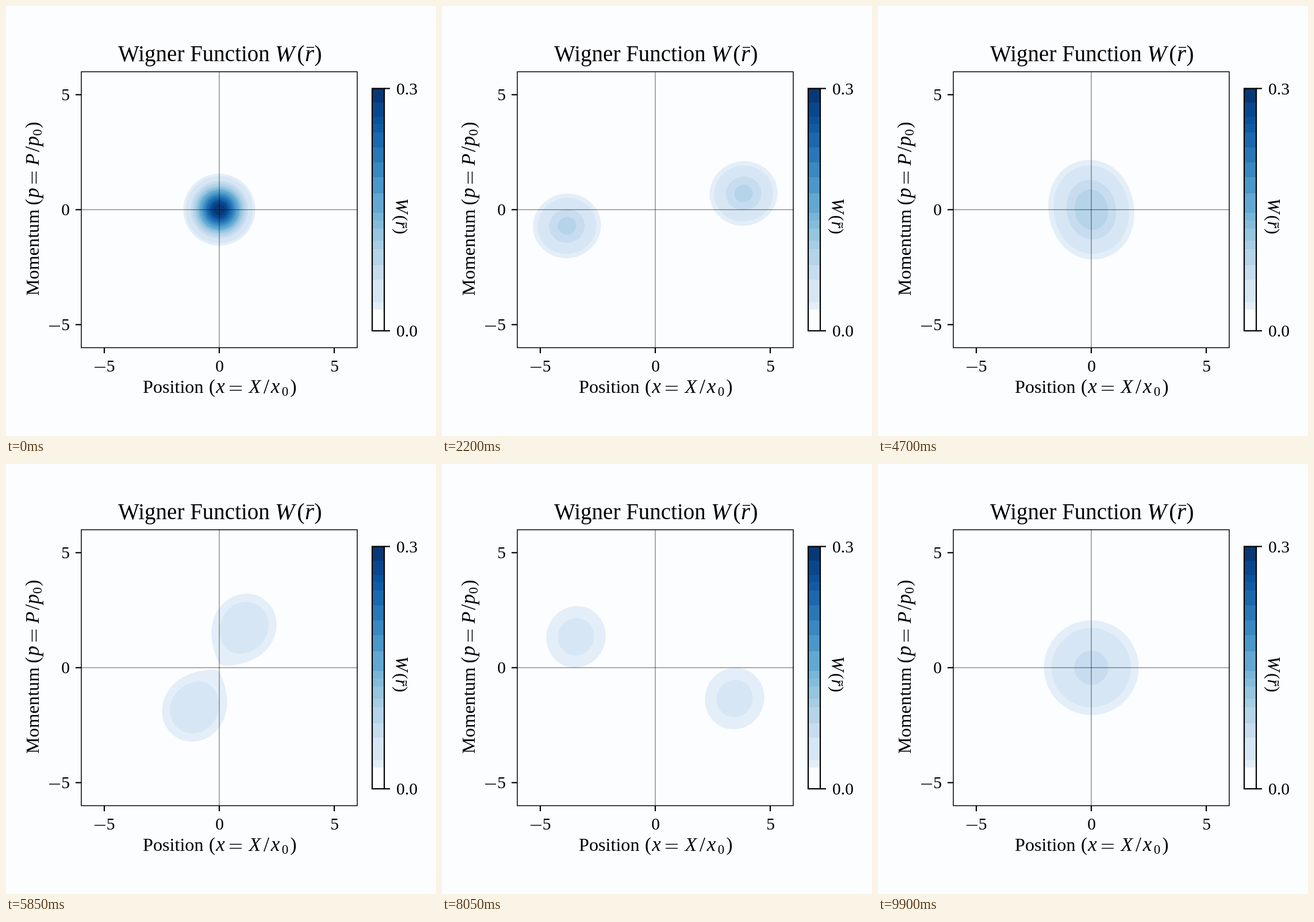
An HTML page with a canvas for the animation above (10 s loop, 748x748 px).

```html
<!DOCTYPE html>
<html lang="en">
<head>
<meta charset="utf-8">
<title>Wigner Function</title>
<style>
html, body { margin: 0; width: 100%; height: 100%; overflow: hidden; background: #fcfdff; }
canvas { display: block; }
</style>
</head>
<body>
<canvas id="stage" width="748" height="748"></canvas>
<script>
const ctx = document.getElementById('stage').getContext('2d');
const SERIF = '"Liberation Serif", "Times New Roman", serif';
const PAPER = [252, 253, 255];
const LEFT = 131, TOP = 114, SIZE = 480;
const CX = 371, CY = 354.3, UNIT = 40;
const BAR = { x: 637, w: 21, top: 143.5, bottom: 565 };

const LOOP = 10000, STEP = 50, LAST = 198, SAMPLES = 199;
const SHIFT = 1.985;    // distance of each oscillation centre from the origin
const DIFFUSION = 0.5;  // momentum noise per radian

// Band edges as fractions of the vacuum peak.
const EDGES = [0.0868, 0.118, 0.2115, 0.27, 0.336, 0.373, 0.422, 0.455, 0.486,
  0.566, 0.633, 0.694, 0.756, 0.8175, 0.855, 0.8815, 0.943];
const BLUES = ['f7fbff', 'deebf7', 'c6dbef', '9ecae1', '6baed6', '4292c6', '2171b5', '08519c', '08306b']
  .map(h => [0, 2, 4].map(i => parseInt(h.slice(i, i + 2), 16)));

const mix = (a, b, t) => a.map((v, i) => v + (b[i] - v) * t);
const css = c => `rgb(${c.map(Math.round).join(',')})`;

function blues(v) {
  const i = Math.min(7, Math.floor(v * 8));
  return mix(BLUES[i], BLUES[i + 1], v * 8 - i);
}

// BANDS[k] fills the values just above EDGES[k - 1].
const BANDS = [PAPER, ...EDGES.map((e, i) => blues((e + (EDGES[i + 1] ?? 1)) / 2))];

const image = ctx.createImageData(SIZE, SIZE);

// Two Gaussians circling opposite centres while momentum diffusion spreads them.
function stateAt(index) {
  const a = 4 * Math.PI * index / SAMPLES;
  const sway = Math.sin(2 * a) / 4;
  const xx = 1 + DIFFUSION * (a / 2 - sway);
  const pp = 1 + DIFFUSION * (a / 2 + sway);
  const xp = DIFFUSION * Math.sin(a) ** 2 / 2;
  const det = xx * pp - xp * xp;
  return {
    x: SHIFT * (1 - Math.cos(a)), p: SHIFT * Math.sin(a),
    ixx: pp / det, ipp: xx / det, ixp: -xp / det,
    peak: 0.5 / Math.sqrt(det)
  };
}

function bandColor(w, slope) {
  let k = 0;
  while (k < EDGES.length && w >= EDGES[k]) k++;
  const below = k > 0 ? 0.5 + (w - EDGES[k - 1]) / slope : 1;
  if (below < 1) return mix(BANDS[k - 1], BANDS[k], below);
  const above = k < EDGES.length ? 0.5 + (w - EDGES[k]) / slope : 0;
  return above > 0 ? mix(BANDS[k], BANDS[k + 1], above) : BANDS[k];
}

function drawField(index) {
  const s = stateAt(index);
  const data = image.data;
  for (let j = 0, o = 0; j < SIZE; j++) {
    const p = (CY - TOP - j - 0.5) / UNIT;
    for (let i = 0; i < SIZE; i++, o += 4) {
      const x = (LEFT + i + 0.5 - CX) / UNIT;
      let w = 0, gx = 0, gp = 0;
      for (let sign = -1; sign <= 1; sign += 2) {
        const dx = x - sign * s.x, dp = p - sign * s.p;
        const hx = s.ixx * dx + s.ixp * dp;
        const hp = s.ixp * dx + s.ipp * dp;
        const q = dx * hx + dp * hp;
        if (q > 9) continue;
        const g = s.peak * Math.exp(-q);
        w += g;
        gx += 2 * g * hx;
        gp += 2 * g * hp;
      }
      const c = w < 0.06 ? PAPER : bandColor(w, Math.hypot(gx, gp) / UNIT + 1e-9);
      data[o] = c[0];
      data[o + 1] = c[1];
      data[o + 2] = c[2];
      data[o + 3] = 255;
    }
  }
  ctx.putImageData(image, LEFT, TOP);
}

function line(x1, y1, x2, y2, width, color = '#000') {
  ctx.strokeStyle = color;
  ctx.lineWidth = width;
  ctx.beginPath();
  ctx.moveTo(x1, y1);
  ctx.lineTo(x2, y2);
  ctx.stroke();
}

// Thin centred stroke for minus, equals and overbar.
const dash = (x, y, width) => line(x - width / 2, y, x + width / 2, y, 1.5);

function text(str, x, y, size, align = 'center', style = '') {
  ctx.font = `${style} ${size}px ${SERIF}`;
  ctx.textAlign = align;
  ctx.fillStyle = '#000';
  ctx.fillText(str, x, y);
}

const math = (str, x, y, size) => text(str, x, y, size, 'center', 'italic');

function rotated(x, y, angle, draw) {
  ctx.save();
  ctx.translate(x, y);
  ctx.rotate(angle);
  draw();
  ctx.restore();
}

// "word (v = V/v0)" on one baseline, with the centre of each math part given.
function axisLabel(word, v, V, at) {
  text(word, 0, 0, 32.2, 'left');
  text('(', at[0], 0, 33);
  math(v, at[1], 0, 35);
  dash(at[2], -4.5, 21);
  dash(at[2], -11.5, 21);
  math(V, at[3], 0, 34);
  text('/', at[4], 1, 36);
  math(v, at[5], 0, 35);
  text('0', at[6], 5, 23);
  text(')', at[7], 0, 33);
}

function drawTicks() {
  for (const v of [-5, 0, 5]) {
    const x = CX + v * UNIT, y = CY - v * UNIT;
    line(x, 594, x, 604, 2.2);
    line(121, y, 131, y, 2.2);
    const digit = String(Math.abs(v));
    text(digit, v < 0 ? 182 : x + 0.5, 636, 29.5);
    text(digit, 111, y + 10, 29.5, 'right');
    if (v < 0) {
      dash(163.5, 628.5, 19);
      dash(84.5, y + 2.5, 19);
    }
  }
}

function drawBar() {
  const { x, w, top, bottom } = BAR;
  const yAt = f => Math.round(bottom - f * (bottom - top));
  BANDS.forEach((c, k) => {
    const y = yAt(EDGES[k] ?? 1);
    ctx.fillStyle = css(c);
    ctx.fillRect(x, y, w, yAt(k ? EDGES[k - 1] : 0) - y);
  });
  ctx.strokeStyle = '#000';
  ctx.lineWidth = 2.2;
  ctx.strokeRect(x, top, w, bottom - top);
  line(x + w, top, x + w + 10, top, 2.2);
  line(x + w, bottom, x + w + 10, bottom, 2.2);
  text('0.3', 679, 154, 29.5, 'left');
  text('0.0', 679, 575, 29.5, 'left');
  rotated(678, 336, Math.PI / 2, () => {
    math('W', 11.5, 0, 32);
    text('(', 33, 0, 30);
    math('r', 44.5, 0, 31);
    text(')', 56, 0, 30);
    ctx.lineWidth = 1.5;
    ctx.beginPath();
    ctx.moveTo(41, -17);
    ctx.bezierCurveTo(44, -22, 47, -14, 50, -19);
    ctx.stroke();
  });
}

function drawLabels() {
  text('Wigner Function', 195, 96, 39, 'left');
  math('W', 485, 96, 41);
  text('(', 513, 96, 40);
  math('r', 528, 96, 41);
  text(')', 543, 96, 40);
  dash(529.5, 72, 13);
  rotated(238, 673, 0, () =>
    axisLabel('Position', 'x', 'X', [120.5, 135, 161.5, 195, 215, 230.5, 247.5, 262]));
  rotated(57, 504, -Math.PI / 2, () =>
    axisLabel('Momentum', 'p', 'P', [163, 179, 205.5, 237, 255, 269, 284, 297]));
}

function drawScene(index) {
  ctx.fillStyle = css(PAPER);
  ctx.fillRect(0, 0, 748, 748);
  drawField(index);
  const gray = 'rgba(0,0,0,0.5)';
  line(CX, TOP, CX, TOP + SIZE, 1.3, gray);
  line(LEFT, CY, LEFT + SIZE, CY, 1.3, gray);
  ctx.strokeStyle = '#000';
  ctx.lineWidth = 1.5;
  ctx.strokeRect(LEFT, TOP + 0.4, SIZE, SIZE);
  drawTicks();
  drawBar();
  drawLabels();
}

const start = performance.now();
let shown = -1;

function tick() {
  const time = Math.max(0, performance.now() - start) % LOOP;
  const index = Math.min(LAST, Math.floor(time / STEP));
  if (index !== shown) drawScene(shown = index);
  requestAnimationFrame(tick);
}
tick();
</script>
</body>
</html>
```
